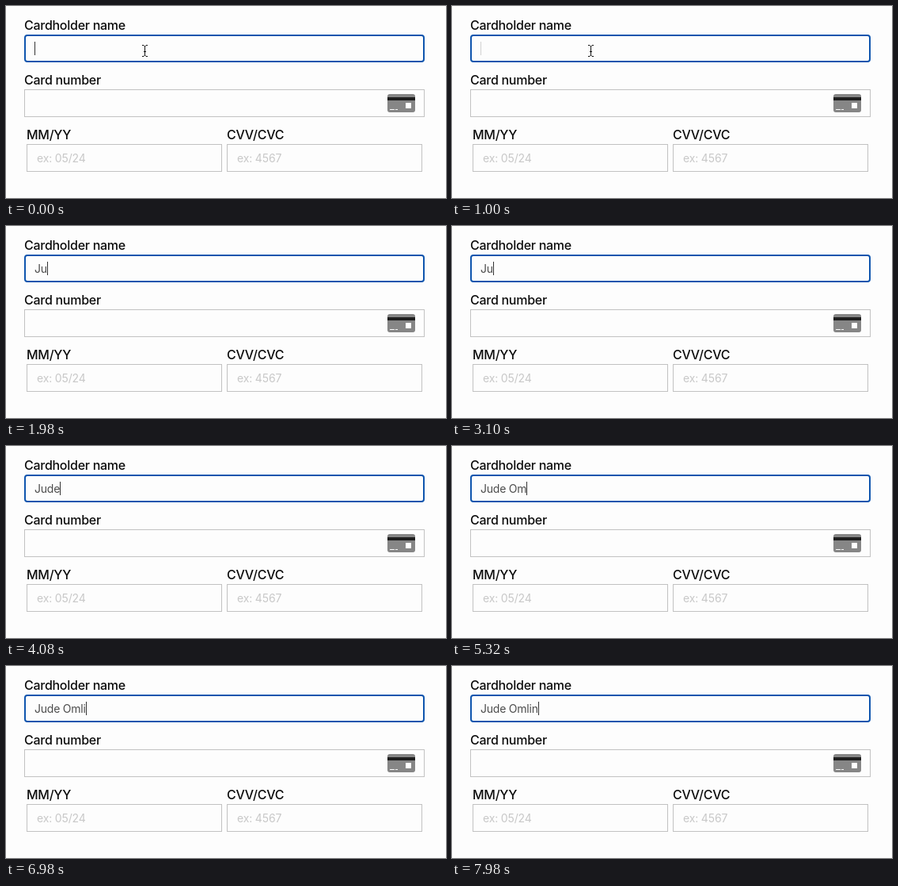
Animation, 556 px wide and 242 px high, one loop 8000 ms. Source, as an HTML page:

```html
<!DOCTYPE html>
<html lang="en">
<head>
<meta charset="utf-8">
<title>Card form</title>
<style>
  html, body { margin: 0; width: 100%; height: 100%; overflow: hidden; background: #fdfdfd; }
  svg { display: block; width: 556px; height: 242px; }
  text { font: 14px Inter, "Liberation Sans", sans-serif; letter-spacing: -.22px; white-space: pre; fill: #4c4c4c; }
  .label { font-size: 16px; font-weight: 500; letter-spacing: -.27px; fill: #0c0c0c; }
  .hint { letter-spacing: -.15px; fill: #c8c8c8; }
  .error { font-size: 10px; letter-spacing: .1px; fill: #c4122a; }
  .box { fill: none; stroke: #c2c2c2; }
</style>
</head>
<body>
<svg viewBox="0 0 556 242">
  <text class="label" x="23" y="30">Cardholder name</text>
  <rect x="24" y="37" width="504" height="33" rx="3" fill="none" stroke="#0f55ae" stroke-width="2"/>
  <text id="name" x="36" y="59"></text>
  <rect id="caret" y="45" width="1" height="17" fill="#333"/>
  <path id="pointer" d="M172 49.5h2l1.5 1.5 1.5-1.5h2M175.5 51v11M172 63.5h2l1.5-1.5 1.5 1.5h2M174 57.5h3" fill="none" stroke="#111"/>
  <text id="error" class="error" x="23" y="89">Holder is required</text>
  <g id="rest">
    <text class="label" x="23" y="99">Card number</text>
    <rect class="box" x="23.5" y="105.5" width="505" height="34"/>
    <rect x="482" y="111" width="35" height="23" rx="3" fill="#868686"/>
    <path d="M482 115h35v4h-35z" fill="#1e1e1e"/>
    <path d="M505 122h7v7h-7zM485 130h6v1h-6zM492 130h3v1h-3z" fill="#fff"/>
    <text class="label" x="26" y="168">MM/YY</text>
    <rect class="box" x="26.5" y="174.5" width="246" height="34"/>
    <text class="hint" x="39" y="197">ex: 05/24</text>
    <text class="label" x="279" y="168">CVV/CVC</text>
    <rect class="box" x="279.5" y="174.5" width="246" height="34"/>
    <text class="hint" x="292" y="197">ex: 4567</text>
  </g>
</svg>
<script>
const $ = id => document.getElementById(id);
const name = "Jude Omlin";
const keyTimes = [1340, 1840, 3300, 3700, 4200, 4600, 5000, 5700, 6400, 7300];
const blinks = [560, 2580];
const LOOP = 8000, FADE = 100, OFF = 420;
const clamp = v => Math.max(0, Math.min(1, v));

// Caret fades out, stays hidden, then fades back in.
const caretAlpha = t => blinks.reduce((a, b) =>
  a - clamp((t - b) / FADE) + clamp((t - b - OFF) / FADE), 1);

function draw(now) {
  const t = now % LOOP;
  const typed = keyTimes.filter(k => t >= k).length;
  const invalid = typed === 1;
  const field = $("name");
  field.textContent = name.slice(0, typed);
  $("caret").setAttribute("x", Math.round(36 + (typed ? field.getComputedTextLength() : 0)));
  $("caret").setAttribute("opacity", caretAlpha(t));
  $("pointer").setAttribute("opacity", typed ? 0 : 1);
  $("error").setAttribute("opacity", invalid ? 1 : 0);
  $("rest").setAttribute("transform", `translate(0 ${invalid ? 24 : 0})`);
}

const start = performance.now();
function tick() {
  draw(performance.now() - start);
  requestAnimationFrame(tick);
}
tick();
</script>
</body>
</html>
```
